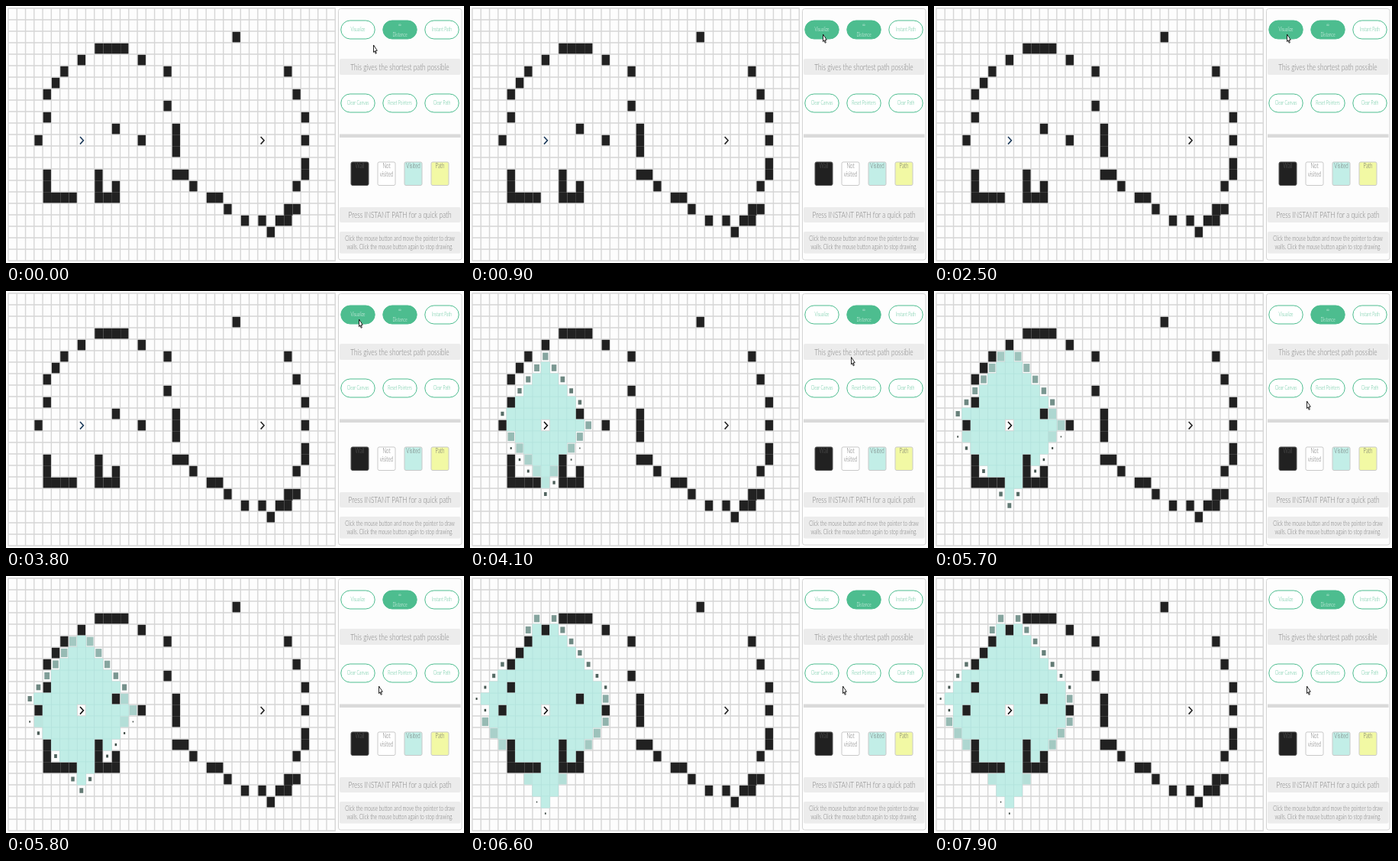
An HTML page with a canvas for the animation above (8 s loop, 600 by 336 pixels).

```html
<!DOCTYPE html>
<html lang="en">
<head>
<meta charset="utf-8">
<title>Pathfinding visualizer</title>
<style>
html, body { margin: 0; width: 100%; height: 100%; overflow: hidden; background: #fff; }
canvas { display: block; }
</style>
</head>
<body>
<canvas id="stage" width="600" height="336"></canvas>
<script>
const ctx = document.getElementById('stage').getContext('2d');
const LOOP = 8000, COLS = 38, ROWS = 22, X0 = 3, Y0 = 3, W = 11.27, H = 15;
const ASPECT = 0.69; // the whole page is shown narrowed
const GREEN = '#4dbd8f';
const START = [8, 11], END = [29, 11];
const wallRows = {
  2: [26], 3: [10, 11, 12, 13], 4: [8, 15], 5: [6, 18, 32], 6: [5], 7: [4, 33],
  8: [18], 9: [4, 34], 10: [12, 19], 11: [3, 15, 19, 34], 12: [19], 13: [34],
  14: [4, 10, 19, 20, 34], 15: [4, 10, 12, 21, 33],
  16: [4, 5, 6, 7, 10, 11, 12, 23, 24], 17: [25, 32, 33], 18: [27, 29, 31, 32], 19: [30]
};
const key = (c, r) => r * COLS + c;
const walls = new Set();
for (const r in wallRows) for (const c of wallRows[r]) walls.add(key(c, +r));

// Breadth-first order: up, down, left, right
function search() {
  const order = [START], seen = new Set(walls).add(key(...START));
  for (let i = 0; i < order.length; i++) {
    const [c, r] = order[i];
    for (const [dc, dr] of [[0, -1], [0, 1], [-1, 0], [1, 0]]) {
      const x = c + dc, y = r + dr;
      if (x < 0 || y < 0 || x >= COLS || y >= ROWS || seen.has(key(x, y))) continue;
      seen.add(key(x, y));
      order.push([x, y]);
    }
  }
  return order;
}
const order = search();
const countTo = (c, r) => order.findIndex(p => p[0] === c && p[1] === r) + 1;

// The screen refreshes in jumps: time, pointer tip, cells reached, hovered button
const steps = [
  { at: 0, tip: [482, 51], count: 0 },
  { at: 500, tip: [463, 37], count: 0, hover: true },
  { at: 3900, tip: [500, 86.5], count: countTo(12, 13) },
  { at: 5000, tip: [489, 144], count: countTo(14, 12) },
  { at: 6000, tip: [489, 144], count: countTo(7, 19) }
];

function box(x, y, w, h, r, fill, stroke) {
  ctx.beginPath();
  ctx.roundRect(x, y, w, h, r);
  ctx.fillStyle = fill;
  ctx.fill();
  if (!stroke) return;
  ctx.strokeStyle = stroke;
  ctx.lineWidth = 1;
  ctx.stroke();
}

function label(text, x, y, size, color) {
  ctx.save();
  ctx.translate(x, y);
  ctx.scale(ASPECT, 1);
  ctx.font = `300 ${size}px Lato, "Open Sans", sans-serif`;
  ctx.textAlign = 'center';
  ctx.textBaseline = 'middle';
  ctx.fillStyle = color;
  ctx.fillText(text, 0, 0);
  ctx.restore();
}

function button(text, x, y, on, icon) {
  box(x - 22.2, y - 12, 44.4, 24, 12, on ? GREEN : '#fff', GREEN);
  const color = on ? '#fff' : GREEN;
  if (icon) label(icon, x, y - 6.5, 7.4, color);
  label(text, x, icon ? y + 7 : y, 7.4, color);
}

function drawGrid() {
  ctx.beginPath();
  for (let c = 0; c <= COLS; c++) {
    ctx.moveTo(X0 + c * W, Y0 - 0.6);
    ctx.lineTo(X0 + c * W, Y0 + ROWS * H + 0.6);
  }
  for (let r = 0; r <= ROWS; r++) {
    ctx.moveTo(X0, Y0 + r * H);
    ctx.lineTo(X0 + COLS * W, Y0 + r * H);
  }
  ctx.strokeStyle = '#d6d6d6';
  ctx.lineWidth = 1.4;
  ctx.stroke();
}

function drawWalls() {
  ctx.fillStyle = '#212121';
  for (const k of walls) {
    const c = k % COLS, r = Math.floor(k / COLS);
    const w = walls.has(key(c + 1, r)) ? W : W - 1;
    const h = walls.has(key(c, r + 1)) ? H : H - 1.4;
    ctx.fillRect(X0 + c * W + 0.6, Y0 + r * H + 0.8, w, h);
  }
}

const mix = (a, b, q) => Math.round(a + (b - a) * q);

function drawVisited(count) {
  for (let i = 1; i < count; i++) {
    const [c, r] = order[i];
    const q = Math.min(1, (count - i) / 26), s = 0.08 + 0.92 * q;
    const w = W * s, h = H * s;
    const x = X0 + (c + 0.5) * W - w / 2, y = Y0 + (r + 0.5) * H - h / 2;
    ctx.fillStyle = `rgb(${mix(40, 192, q)},${mix(50, 237, q)},${mix(45, 230, q)})`;
    ctx.fillRect(x, y, w, h);
    if (q < 1) continue;
    ctx.strokeStyle = '#b3e2dc';
    ctx.lineWidth = 0.7;
    ctx.strokeRect(x, y, w, h);
  }
  if (count) {
    const [c, r] = START;
    box(X0 + c * W + 0.3, Y0 + r * H + 0.3, W - 0.6, H - 0.6, 0, '#fff', '#d6d6d6');
  }
}

function chevron([c, r], color) {
  const x = X0 + (c + 0.5) * W, y = Y0 + (r + 0.5) * H + 0.3;
  ctx.beginPath();
  ctx.moveTo(x - 1.8, y - 4.8);
  ctx.lineTo(x + 2.6, y);
  ctx.lineTo(x - 1.8, y + 4.8);
  ctx.strokeStyle = color;
  ctx.lineWidth = 1.6;
  ctx.stroke();
}

function drawPanel(hover) {
  box(435.5, 3.5, 161.5, 328.5, 3, '#fdfdfd', '#d4d4d4');
  button('Visualize', 461, 31, hover);
  button('Distance', 516, 31, true, '∞');
  button('Instant Path', 571, 31);
  button('Clear Canvas', 461, 127);
  button('Reset Pointers', 516, 127);
  button('Clear Path', 571, 127);

  for (const [y, h] of [[69, 21], [263, 20], [295, 28.5]]) box(437, y, 158.5, h, 2, '#ececec');
  label('This gives the shortest path possible', 516, 80, 12, '#808080');
  label('Press INSTANT PATH for a quick path', 516, 273.5, 12, '#808080');
  label('Click the mouse button and move the pointer to draw', 516, 304.5, 9, '#777');
  label('walls. Click the mouse button again to stop drawing.', 516, 315.5, 9, '#777');
  box(437, 167.5, 158.5, 4.5, 0, '#dadada');

  const legend = [['Wall', '#212121'], ['Not visited', '#fff'], ['Visited', '#c2eee7'], ['Path', '#f2f9a4']];
  legend.forEach(([text, color], i) => {
    const x = 463.5 + i * 35;
    box(x - 11.5, 204, 23, 30.5, 2, color, i ? '#c9c9c9' : '#555');
    text.split(' ').forEach((word, n) => label(word, x, 209.5 + n * 10.5, 9, i ? '#666' : '#5c5c5c'));
  });
}

function pointer([x, y]) {
  ctx.save();
  ctx.translate(x - 0.5, y);
  ctx.beginPath();
  [[0, 0], [0, 9.6], [1.5, 7.8], [2.7, 11.3], [3.8, 10.7], [2.7, 7.3], [4.8, 7.3]]
    .forEach(p => ctx.lineTo(...p));
  ctx.closePath();
  ctx.fillStyle = '#fff';
  ctx.fill();
  ctx.strokeStyle = '#111';
  ctx.lineWidth = 0.9;
  ctx.stroke();
  ctx.restore();
}

function draw(now) {
  const t = now % LOOP;
  const step = steps.filter(s => s.at <= t).pop();
  ctx.fillStyle = '#fdfdfd';
  ctx.fillRect(0, 0, 600, 336);
  drawGrid();
  drawVisited(step.count);
  drawWalls();
  chevron(START, step.count ? '#111' : '#1b3a5a');
  chevron(END, '#222');
  drawPanel(step.hover);
  pointer(step.tip);
}

const begin = performance.now();
function frame() {
  draw(performance.now() - begin);
  requestAnimationFrame(frame);
}
frame();
</script>
</body>
</html>
```
